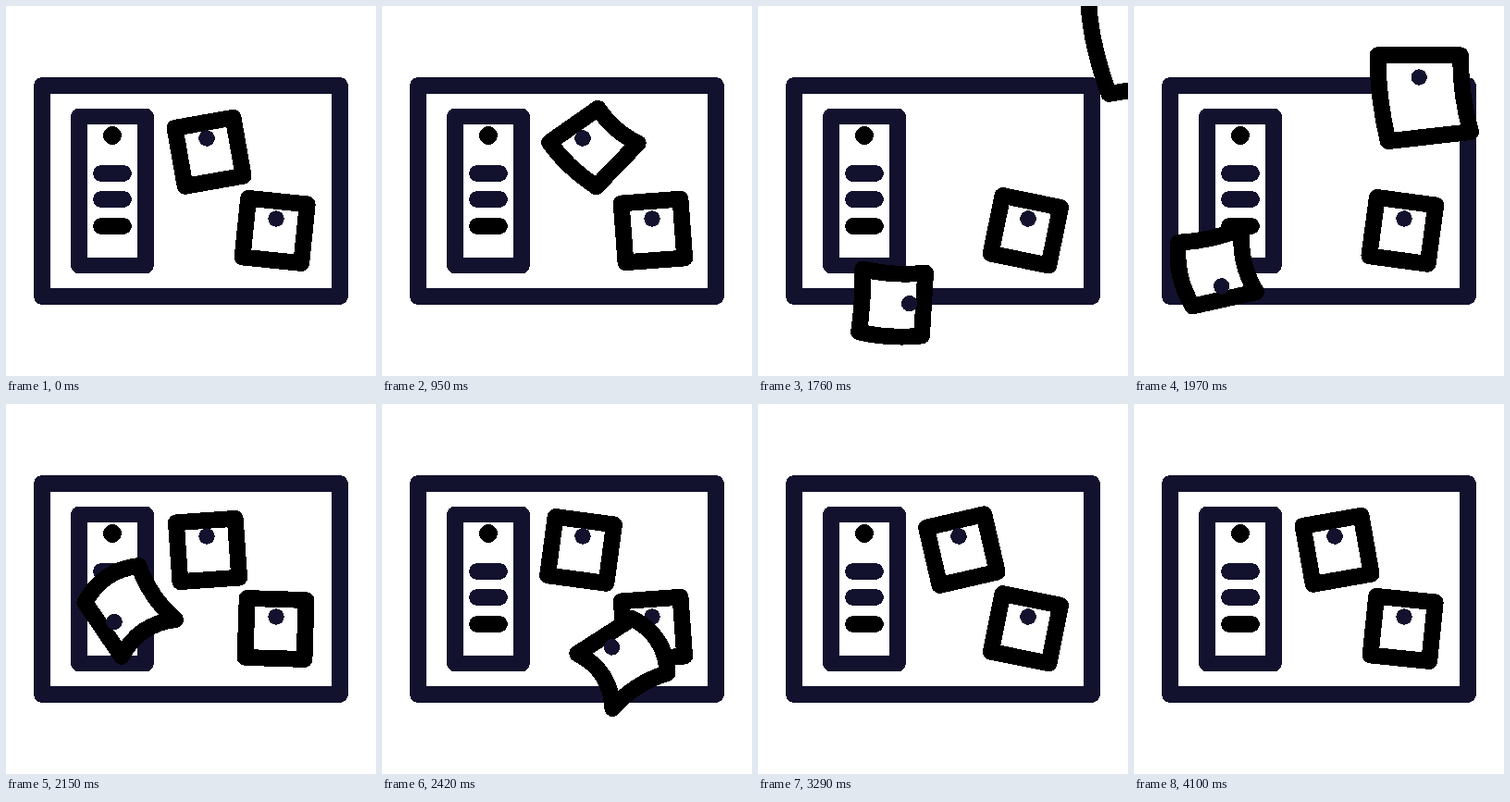
An HTML page for the animation above (4130 ms loop, 400 by 400 pixels).

```html
<!DOCTYPE html>
<html lang="en">
<head>
<meta charset="utf-8">
<title>Pinboard</title>
<style>
  html, body { margin: 0; width: 100%; height: 100%; overflow: hidden; background: #fff; }
  svg { display: block; width: 100vw; height: 100vh; }
  svg * { shape-rendering: crispEdges; }
  .line { fill: #fff; stroke-width: 17.8; stroke-linejoin: round; stroke-linecap: round; }
  .navy { stroke: #12122e; }
  .black { stroke: #000; }
  .pin { fill: #12122e; }
</style>
</head>
<body>
<svg viewBox="0 0 400 400">
  <rect class="line navy" x="39" y="86" width="322" height="228"/>
  <rect class="line navy" x="79" y="119.5" width="72" height="161"/>
  <circle cx="115" cy="140" r="10"/>
  <path class="line navy" d="M103 181h24M103 209h24"/>
  <path class="line black" d="M103 238h24"/>
</svg>
<script>
const LOOP = 4130, START = 530, STEP = 30, RAD = Math.PI / 180;
const HOME = { x: 217, y: 143 };
const svg = document.querySelector('svg');

const clamp = (v, lo, hi) => Math.min(hi, Math.max(lo, v));
const mix = (a, b, k) => a + (b - a) * k;
const smooth = u => u * u * (3 - 2 * u);
const ease = (t, from, to) => smooth(clamp((t - from) / (to - from), 0, 1));

// Hangs on its pin and sways like a pendulum, ending where it began
function swaying(t) {
  const phase = (clamp(t, START, 3530) - 970) / 1500;
  return { x: 292, y: 230, drop: 13, angle: 3.7 - 8 * Math.cos(2 * Math.PI * phase) };
}

// Tilts, comes loose, then flutters round a sinking circle and out at the bottom
function falling(t) {
  const u = clamp((t - 1050) / 1610, 0, 1);
  const spin = .25 * u + .75 * smooth(u ** 1.3);
  const angle = -10 - 25 * ease(t, START, 950) + 406 * spin;
  const stretch = ease(t, 1460, 1970), loose = ease(t, 1050, 1460);
  const scale = 1 + .1 * stretch, drop = 15 + 4 * stretch;
  const sin = Math.sin(angle * RAD), cos = Math.cos(angle * RAD);
  const age = t - 1050;
  const x = 100 + .07 * age + 76 * cos + drop * scale * sin;
  const y = 193 + .05 * age + 3.2e-5 * age * age + 76 * sin - drop * scale * cos;
  return {
    x: mix(HOME.x, x, loose), y: mix(HOME.y, y, loose), angle, scale, drop,
    bend: 14 * ease(t, START, 950) * (1 - loose),
    bulge: 20 * Math.sin(Math.PI * u ** 3)
  };
}

// Flies in from the upper right, shrinking, then sways until it rests
function arriving(t) {
  const away = Math.max(0, (2150 - t) / 450);
  const sway = 19 * ease(t, 2150, 2620) - 28 * ease(t, 2620, 3250) + 3 * ease(t, 3250, 3900);
  return {
    x: HOME.x + 228 * away, y: HOME.y - 165 * away, drop: 15,
    angle: -4 + 10 * away + sway, scale: 1 + away, bend: 20 * away
  };
}

function addShape(tag, cls, parent) {
  const el = document.createElementNS('http://www.w3.org/2000/svg', tag);
  el.setAttribute('class', cls);
  return parent.appendChild(el);
}

function makeNote(pose) {
  const group = addShape('g', '', svg);
  const sheet = addShape('path', 'line black', group);
  addShape('circle', 'pin', group).setAttribute('r', 8.7);
  return { group, sheet, pose };
}

// The pin is the note's origin; bend shifts the lower edge, bulge curves the sides
function drawNote({ group, sheet, pose }, t) {
  const { x, y, angle, drop, scale = 1, bend = 0, bulge = 0 } = pose(t);
  const p = (px, py) => `${(px * scale).toFixed(2)} ${(py * scale).toFixed(2)} `;
  const top = drop - 32, low = drop + 32;
  const left = low + bend * .3, right = low - bend * .6;
  sheet.setAttribute('d',
    'M' + p(-32, top) + 'L' + p(32, top) +
    'Q' + p(32 + bulge, drop) + p(32 + bend, right) +
    'Q' + p(bend, (left + right - bulge) / 2) + p(bend - 32, left) +
    'Q' + p(bulge - 32, drop) + p(-32, top) + 'Z');
  group.setAttribute('transform', `translate(${x} ${y}) rotate(${angle})`);
}

const notes = [swaying, falling, arriving].map(makeNote);

function draw(now) {
  let t = now % LOOP;
  t = t < START ? 0 : START + Math.floor((t - START) / STEP) * STEP;
  notes.forEach(note => drawNote(note, t));
  requestAnimationFrame(draw);
}
draw(0);
</script>
</body>
</html>
```
